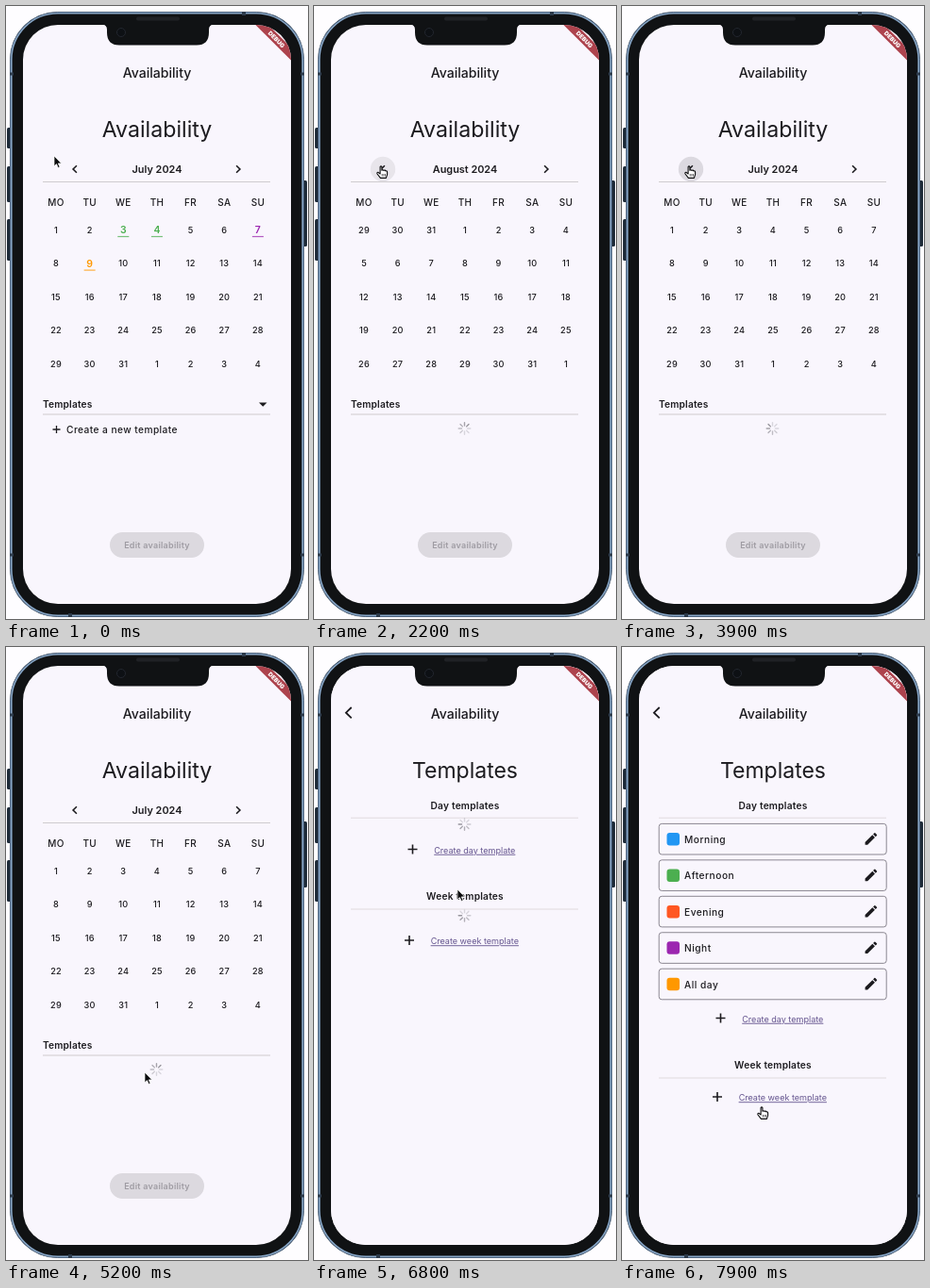
Recreate the animation shown at these times as an HTML page. Size 320x650 px, loop 8000 ms.

```html
<!DOCTYPE html>
<html lang="en">
<head>
<meta charset="utf-8">
<title>Availability</title>
<style>
  html, body { margin: 0; width: 100%; height: 100%; overflow: hidden; background: #fefdff; }
  svg { display: block; }
  text { font-family: Inter, Roboto, sans-serif; fill: #1c1b1f; text-anchor: middle; white-space: pre; }
  .line { fill: none; stroke: #1c1b1f; }
</style>
</head>
<body>
<svg width="320" height="650" viewBox="0 0 320 650">
  <defs>
    <clipPath id="glass"><rect x="18" y="20" width="284" height="614" rx="37"/></clipPath>
  </defs>
  <g fill="#1d2a38">
    <rect x="1" y="129" width="5" height="22" rx="1.5"/>
    <rect x="1" y="170" width="5" height="38" rx="1.5"/>
    <rect x="1" y="226" width="5" height="44" rx="1.5"/>
    <rect x="314" y="185" width="5" height="70" rx="1.5"/>
  </g>
  <rect x="4.5" y="6.5" width="311" height="641" rx="50" fill="#101214" stroke="#4a607a"/>
  <rect x="5.8" y="7.8" width="308.4" height="638.4" rx="49" fill="none" stroke="#86a5c6" stroke-width="1.6"/>
  <g fill="#2c3a4a">
    <rect x="4" y="70.5" width="4" height="3"/><rect x="312" y="70.5" width="4" height="3"/>
    <rect x="4" y="580.5" width="4" height="3"/><rect x="312" y="580.5" width="4" height="3"/>
    <rect x="250" y="6" width="4" height="4"/><rect x="66" y="644" width="4" height="4"/>
  </g>
  <g clip-path="url(#glass)">
    <rect x="18" y="20" width="284" height="614" fill="#f9f6fd"/>
    <g id="screen"></g>
    <g transform="translate(302 20) rotate(45)">
      <rect x="-40" y="17" width="80" height="9.6" fill="#ad434d"/>
      <text y="24.1" style="font-size:6.3px;font-weight:900;fill:#fff">DEBUG</text>
    </g>
  </g>
  <path d="M102 19.5Q107 20 107 25V28Q107 41.5 120 41.5H202Q215 41.5 215 28V25Q215 20 220 19.5Z" fill="#101214"/>
  <rect x="138" y="11.5" width="46" height="4" rx="2" fill="#202226"/>
  <circle cx="122" cy="28" r="4.5" fill="#0d1014" stroke="#22262e"/>
  <g id="cursor"></g>
</svg>
<script>
const LOOP = 8000;
const INK = '#1c1b1f', PAPER = '#f9f6fd', LINE = '#cfccce';
const GREEN = '#4caf50', PURPLE = '#9c27b0', ORANGE = '#ff9800';
const CLICKS = [1400, 2350];             // next month, previous month
const PUSH = 6050, PUSH_LEN = 480;
const byId = id => document.getElementById(id);
const clamp = v => Math.max(0, Math.min(1, v));
const part = (t, start, len) => clamp((t - start) / len);
const easeOut = p => 1 - (1 - p) ** 3;
const smooth = p => p * p * (3 - 2 * p);

function text(x, y, size, str, o = {}) {
  const { weight = 400, space = 0, color = INK, anchor = 'middle', more = '' } = o;
  return `<text x="${x}" y="${y + size * 0.364}" style="font-size:${size}px;font-weight:${weight};` +
    `letter-spacing:${space}px;fill:${color};text-anchor:${anchor};${more}">${str}</text>`;
}
const rule = (y, color = LINE) => `<rect x="39" y="${y}" width="241" height="1" fill="${color}"/>`;
const plus = (x, y, r, w) =>
  `<path class="line" stroke-width="${w}" d="M${x - r} ${y}H${x + r}M${x} ${y - r}V${y + r}"/>`;
const chevron = (x, y, w, h, width) =>
  `<path class="line" stroke-width="${width}" d="M${x - w} ${y - h}L${x + w} ${y}L${x - w} ${y + h}"/>`;
const move = (x, y, body) => `<g transform="translate(${x} ${y})">${body}</g>`;

function spinner(x, y, t) {
  const head = Math.floor(t / 125);
  let s = '';
  for (let i = 0; i < 8; i++) {
    const age = (((head - i) % 8) + 8) % 8;
    s += `<path d="M0 -3V-6.3" stroke="#77757d" stroke-width="1.4" stroke-linecap="round"
      opacity="${Math.max(0.25, 0.75 - age * 0.1)}" transform="rotate(${i * 45})"/>`;
  }
  return move(x, y, s);
}

function month(firstDay, marks) {
  const x = col => 53 + col * 35.65;
  let s = ['MO', 'TU', 'WE', 'TH', 'FR', 'SA', 'SU']
    .map((d, i) => text(x(i), 208.7, 10, d, { weight: 500, space: 0.3 })).join('');
  for (let i = 0; i < 35; i++) {
    const day = new Date(2024, 6, firstDay + i).getDate();
    const cx = x(i % 7), cy = 237.2 + Math.floor(i / 7) * 35.6;
    const color = i < 9 && marks[day];
    s += color
      ? text(cx, cy, 10.5, day, { weight: 600, color }) +
        `<rect x="${cx - 6}" y="${cy + 6.7}" width="12" height="1.2" fill="${color}" opacity=".75"/>`
      : text(cx, cy, 9.2, day, { weight: 500, space: 0.2 });
  }
  return s;
}

const MARKS = { 3: GREEN, 4: GREEN, 7: PURPLE, 9: ORANGE };

// Round highlight behind a month arrow: light on hover, darker once pressed.
function highlight(x, t, enter, press, leave) {
  const seen = part(t, enter, 80) * (1 - part(t, leave, 120));
  const alpha = seen * (0.08 + 0.05 * part(t, press, 150));
  return `<circle cx="${x}" cy="173" r="13.2" fill="${INK}" opacity="${alpha}"/>`;
}

function calendarPage(t) {
  const [a, b] = CLICKS.map(start => easeOut(part(t, start, 300)));
  const shift = (a - b) * 250;
  const loading = t >= CLICKS[0] && t < 5450;
  const marks = loading ? {} : MARKS;
  let s = text(160, 70.5, 14.1, 'Availability', { weight: 500 }) +
    text(160, 130.5, 23.2, 'Availability') +
    highlight(246, t, 1100, CLICKS[0], 1600) + highlight(73, t, 2000, CLICKS[1], 4250) +
    text(160, 173, 10.9, shift > 125 ? 'August 2024' : 'July 2024', { weight: 600 }) +
    chevron(73, 173, -1.9, 3.7, 1.6) + chevron(246, 173, 1.9, 3.7, 1.6) + rule(186) +
    '<svg x="36" y="196" width="248" height="200" viewBox="36 196 248 200">' +
    (shift < 250 ? move(-shift, 0, month(1, marks)) : '') +
    (shift > 0 ? move(250 - shift, 0, month(29, {})) : '') + '</svg>' +
    text(39, 422.7, 10.2, 'Templates', { weight: 600, space: 0.15, anchor: 'start' }) + rule(432.5);
  s += loading ? spinner(159.5, 448, t)
    : `<path d="M268 420.5H276.5L272.25 424.8Z" fill="${INK}"/>` + plus(53.5, 449, 4, 1.3) +
      text(64, 449, 10.2, 'Create a new template', { weight: 500, space: 0.42, anchor: 'start' });
  return s + '<rect x="110" y="558" width="100" height="27" rx="13.5" fill="#dcd9df"/>' +
    text(160, 571.5, 9, 'Edit availability', { weight: 600, space: 0.25, color: '#9f9ca3' });
}

const SHIFTS = [['Morning', '#2196f3'], ['Afternoon', GREEN], ['Evening', '#ff5722'],
  ['Night', PURPLE], ['All day', ORANGE]];
const PENCIL = 'M3 17.25V21h3.75L17.81 9.94l-3.75-3.75zM20.71 7.04a1 1 0 0 0 0-1.41l-2.34-2.34' +
  'a1 1 0 0 0-1.41 0l-1.83 1.83 3.75 3.75z';

const tile = ([name, color], i) => move(0, 187 + i * 38.45,
  '<rect x="39.2" y=".4" width="241" height="32.6" rx="3" fill="none" stroke="#8b8791"/>' +
  `<rect x="47.5" y="10" width="13.5" height="13.5" rx="3" fill="${color}"/>` +
  text(66, 17, 10.2, name, { weight: 500, space: 0.5, anchor: 'start' }) +
  `<path d="${PENCIL}" fill="${INK}" transform="translate(255.5 8) scale(.7)"/>`);

const link = (x, y, label) => plus(x, y - 1, 5, 1.6) +
  text(170.3, y, 9.05, label, { color: '#65558f', more: 'text-decoration:underline' });

function templatesPage(t) {
  const loaded = t >= 7300;
  const heading = { weight: 600, space: 0.2 };
  const down = loaded ? 179 : 0;
  return `<rect x="18" y="20" width="284" height="614" fill="${PAPER}"/>` +
    chevron(36.8, 69.7, -2.9, 5.7, 1.8) + text(160, 70.5, 14.1, 'Availability', { weight: 500 }) +
    text(160, 130.5, 23, 'Templates') +
    text(160, 168, 10.2, 'Day templates', heading) + rule(180.7, '#e0dbde') +
    (loaded ? SHIFTS.map(tile).join('') : spinner(159.5, 188, t) + spinner(159.5, 284.8, t)) +
    link(104.5, 215.5 + down, 'Create day template') +
    move(0, down, text(160, 264.5, 10.2, 'Week templates', heading) + rule(277.5, '#e0dbde')) +
    link(101, loaded ? 478 : 312, 'Create week template');
}

const PATH = [[0, 51, 159], [500, 51, 159], [1200, 233, 180], [1500, 233, 180],
  [2080, 71, 170], [4150, 71, 170], [5050, 147, 451], [5300, 147, 451], [5600, 140, 446],
  [6150, 140, 446], [6700, 152, 257], [7050, 152, 257], [7800, 148, 488], [8000, 148, 488]];
const HAND_TIMES = [[1080, 1620], [2000, 4260], [5460, 6200], [7740, 8000]];
const ARROW = '<path d="M0 0V10.8L2.5 8.6L4.2 12.5L6 11.7L4.3 7.9H7.7Z" fill="#0b0b0d" stroke="#fff" stroke-width=".7"/>';
const HAND = '<path d="M-.9 .6Q0 -.8 .9 .6V4.2Q2 3.3 2.9 4.4Q4.1 3.6 4.9 4.9Q6.4 4.5 6.6 6V8.6L5.4 12.4H-.6' +
  'L-4 8Q-4.6 6.3 -3 6.4L-.9 8Z" fill="#fff" stroke="#0b0b0d" stroke-width="1.1" stroke-linejoin="round"/>' +
  '<path class="line" stroke-width=".7" d="M1.2 8V10.5M2.9 8V10.5M4.5 8V10.5"/>';

function cursor(t) {
  const i = Math.max(1, PATH.findIndex(k => k[0] >= t));
  const [t0, x0, y0] = PATH[i - 1], [t1, x1, y1] = PATH[i];
  const p = smooth(part(t, t0, t1 - t0));
  const hand = HAND_TIMES.some(([from, to]) => t >= from && t < to);
  return move(x0 + (x1 - x0) * p, y0 + (y1 - y0) * p, hand ? HAND : ARROW);
}

function draw(now) {
  const t = now % LOOP;
  const push = easeOut(part(t, PUSH, PUSH_LEN));
  byId('screen').innerHTML =
    (push < 1 ? move(-95 * push, 0, calendarPage(t)) : '') +
    (push > 0 ? move(284 * (1 - push), 0, templatesPage(t)) : '');
  byId('cursor').innerHTML = cursor(t);
}

const begin = performance.now();
function tick() {
  draw(performance.now() - begin);
  requestAnimationFrame(tick);
}
tick();
</script>
</body>
</html>
```
